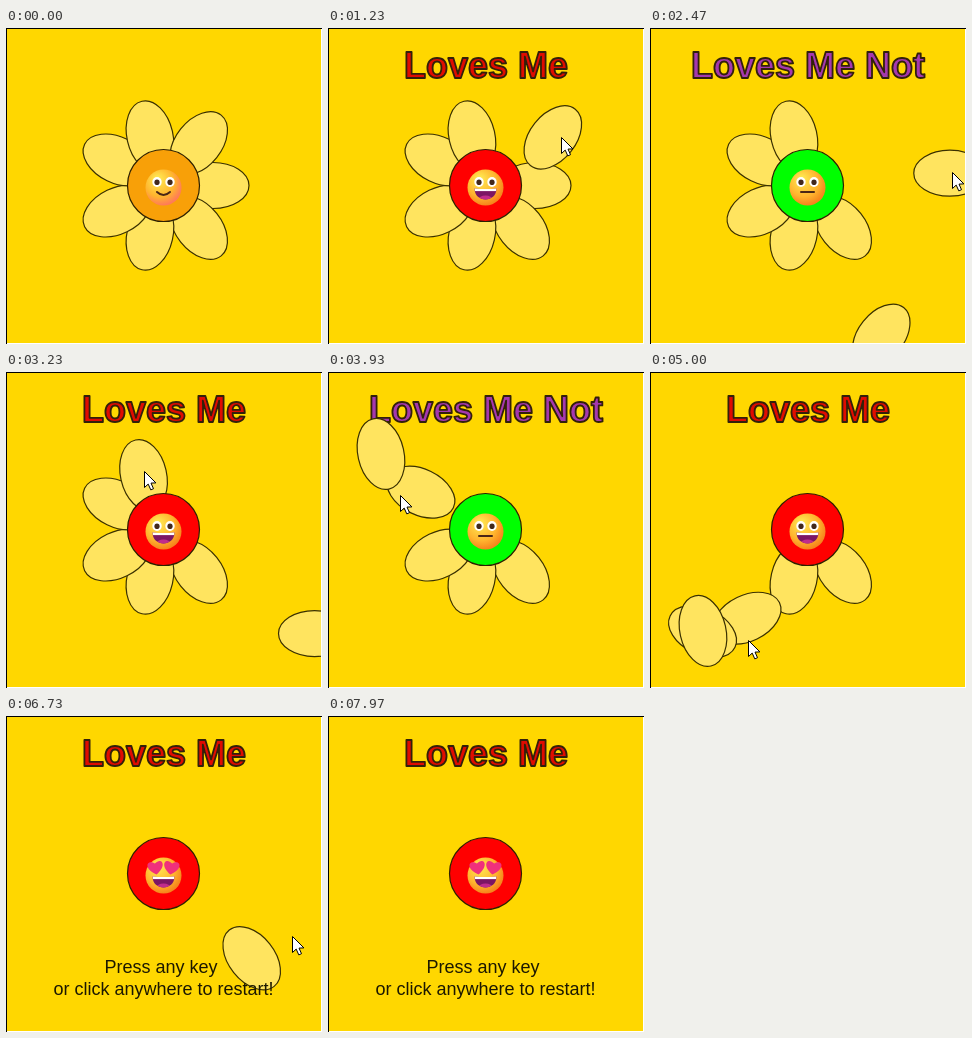
Recreate the animation shown at these times as an HTML page with a canvas. Size 316 px wide and 316 px high, loop 8 s.

```html
<!DOCTYPE html>
<html lang="en">
<head>
<meta charset="utf-8">
<title>Petal picking</title>
<style>
  html, body { margin: 0; width: 100%; height: 100%; overflow: hidden; background: #ffd700; }
  canvas { display: block; width: 316px; height: 316px; }
</style>
</head>
<body>
<canvas id="stage"></canvas>
<script>
const SIZE = 316, LOOP = 8000, MID = 157.5, COUNT = 7;
const FALL = 0.1654; // px per ms
const TAU = Math.PI * 2;
const canvas = document.getElementById('stage');
const ctx = canvas.getContext('2d');
const ratio = window.devicePixelRatio || 1;
canvas.width = canvas.height = SIZE * ratio;

const at = (t, x, y) => ({ t, x, y });
const mix = (a, b, k) => ({ x: a.x + (b.x - a.x) * k, y: a.y + (b.y - a.y) * k });
const smooth = k => k * k * (3 - 2 * k);

// Where the pointer grabs and drops each petal, in picking order
const pulls = [
  [at(1060, 201, 114.5), at(1265, 239.5, 107.5)],
  [at(1950, 209.5, 156.5), at(2520, 311, 143)],
  [at(3200, 144, 104), at(3640, 53, 29.5)],
  [at(3900, 90, 135), at(4000, 31.5, 97)],
  [at(4650, 112, 205), at(5050, 96, 277)],
  [at(5380, 148, 216), at(5650, 184, 226)],
  [at(5850, 217, 226), at(6450, 270, 222)]
];
const path = [at(250, 332, 190), ...pulls.flat(), at(7300, 332, 214)];

function pointer(t) {
  const i = path.findIndex(p => p.t > t);
  if (i < 1) return null;
  const a = path[i - 1], b = path[i];
  const k = (t - a.t) / (b.t - a.t);
  const dragging = i % 2 === 0;
  return mix(a, b, dragging ? k : smooth(k));
}

// Angle in degrees and distance of the lower petals; the upper ones mirror them
const seats = [[0, 49.5], [50.2, 55], [105.4, 51], [151.2, 53]];
const order = [6, 0, 5, 4, 3, 2, 1];

const petals = Array.from({ length: COUNT }, (_, slot) => {
  const upper = slot > 3;
  const [degrees, reach] = seats[upper ? COUNT - slot : slot];
  const seat = (upper ? -degrees : degrees) * TAU / 360;
  const [grab, drop] = pulls[order.indexOf(slot)];
  return {
    grab, drop, tilt: slot * TAU / COUNT,
    x: MID + reach * Math.cos(seat), y: MID + reach * Math.sin(seat)
  };
});

function petalAt({ x, y, grab, drop }, t) {
  if (t < grab.t) return { x, y };
  const k = Math.min(1, (t - grab.t) / (drop.t - grab.t));
  const hand = mix(grab, drop, k);
  return {
    x: x + hand.x - grab.x,
    y: y + hand.y - grab.y + Math.max(0, t - drop.t) * FALL
  };
}

function oval(x, y, rx, ry, fill, angle = 0, stroke) {
  ctx.beginPath();
  ctx.ellipse(x, y, rx, ry, angle, 0, TAU);
  ctx.fillStyle = fill;
  ctx.fill();
  if (stroke) {
    ctx.strokeStyle = stroke;
    ctx.lineWidth = 1.2;
    ctx.stroke();
  }
}

function heart(x, tilt) {
  ctx.save();
  ctx.translate(x, -8);
  ctx.rotate(tilt);
  ctx.beginPath();
  ctx.moveTo(0, 7);
  ctx.bezierCurveTo(-13, -1, -7, -10, 0, -4);
  ctx.bezierCurveTo(7, -10, 13, -1, 0, 7);
  ctx.fillStyle = '#f0307c';
  ctx.fill();
  ctx.restore();
}

function eyes() {
  for (const x of [-6.5, 6.5]) {
    oval(x, -5.5, 4.7, 5, '#fff');
    oval(x, -5.2, 2.6, 2.8, '#42281c');
  }
}

function lips(bend) {
  ctx.beginPath();
  ctx.moveTo(-6.5, 4.5);
  ctx.quadraticCurveTo(0, 4.5 + bend, 6.5, 4.5);
  ctx.strokeStyle = '#4a2616';
  ctx.lineWidth = 2;
  ctx.lineCap = 'round';
  ctx.stroke();
}

function grin() {
  ctx.save();
  ctx.beginPath();
  ctx.moveTo(-11, 1);
  ctx.quadraticCurveTo(0, 2, 11, 1);
  ctx.bezierCurveTo(11, 15.5, -11, 15.5, -11, 1);
  ctx.fillStyle = '#7c1664';
  ctx.fill();
  ctx.clip();
  oval(0, 12, 7, 4, '#c02c8c');
  ctx.fillStyle = '#fff';
  ctx.fillRect(-11, 0, 22, 3.6);
  ctx.restore();
}

function face(mood) {
  ctx.save();
  ctx.translate(157.5, 159.5);
  const skin = ctx.createRadialGradient(-6, -9, 2, -3, -4, 22);
  skin.addColorStop(0, '#ffe650');
  skin.addColorStop(0.65, '#ffb42e');
  skin.addColorStop(1, mood === 'smile' ? '#ff7a58' : '#f6841c');
  oval(0, 0, 18, 18, skin);
  if (mood === 'love') {
    heart(-8, -0.15);
    heart(8, 0.15);
  } else eyes();
  if (mood === 'smile') lips(6);
  else if (mood === 'flat') lips(0);
  else grin();
  ctx.restore();
}

function title(text, color) {
  ctx.font = 'bold 36px "Liberation Sans", Arial, sans-serif';
  ctx.fillStyle = color;
  ctx.fillText(text, 158, 50);
  ctx.strokeStyle = '#33200a';
  ctx.lineWidth = 1.8;
  ctx.lineJoin = 'round';
  ctx.strokeText(text, 158, 50);
}

function arrow({ x, y }) {
  ctx.save();
  ctx.translate(Math.round(x) + 0.5, Math.round(y) + 0.5);
  ctx.beginPath();
  [[0, 0], [0, 16], [3.7, 12.6], [6.3, 18.4], [9, 17.2], [6.5, 11.6], [11.4, 11.4]]
    .forEach(p => ctx.lineTo(...p));
  ctx.closePath();
  ctx.fillStyle = '#fff';
  ctx.fill();
  ctx.strokeStyle = '#000';
  ctx.lineWidth = 1;
  ctx.stroke();
  ctx.restore();
}

function edges() {
  ctx.fillStyle = '#fff';
  ctx.fillRect(0, SIZE - 1, SIZE, 1);
  ctx.fillRect(SIZE - 1, 0, 1, SIZE);
  ctx.fillStyle = '#000';
  ctx.fillRect(0, 0, SIZE, 1);
  ctx.fillRect(0, 0, 1, SIZE);
}

function draw(t) {
  const picked = petals.filter(p => t >= p.grab.t).length;
  const loves = picked % 2 === 1;
  const over = petals.every(p => t >= p.drop.t);
  ctx.setTransform(ratio, 0, 0, ratio, 0, 0);
  ctx.textAlign = 'center';
  ctx.fillStyle = '#ffd700';
  ctx.fillRect(0, 0, SIZE, SIZE);

  if (picked) title(loves ? 'Loves Me' : 'Loves Me Not', loves ? '#e00c00' : '#a538ae');
  for (const p of petals) {
    const { x, y } = petalAt(p, t);
    oval(x, y, 36, 23, '#ffe45f', p.tilt, '#3a3000');
  }
  oval(MID, MID, 36, 36, !picked ? '#f8a008' : loves ? '#f00' : '#0f0', 0, '#2e2000');
  face(!picked ? 'smile' : over ? 'love' : loves ? 'grin' : 'flat');

  if (over) {
    ctx.font = '18px "Liberation Sans", Arial, sans-serif';
    ctx.fillStyle = '#1c1800';
    ctx.fillText('Press any key', 155, 257);
    ctx.fillText('or click anywhere to restart!', 157.5, 279);
  }
  edges();
  const hand = pointer(t);
  if (hand) arrow(hand);
}

const start = performance.now();
function tick() {
  draw((performance.now() - start) % LOOP);
  requestAnimationFrame(tick);
}
tick();
</script>
</body>
</html>
```
